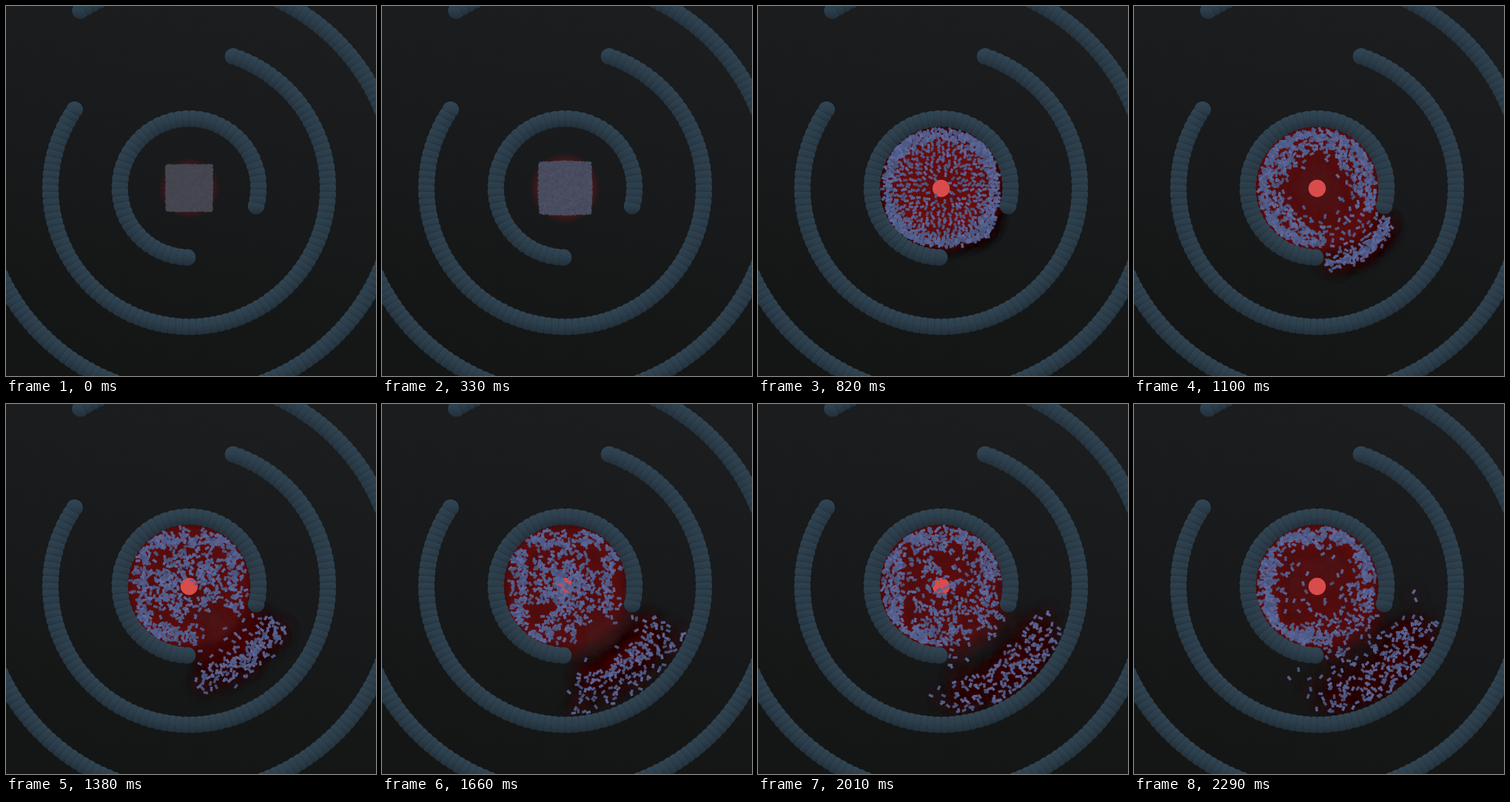
Recreate the animation shown at these times as an HTML page with a canvas. Size 500 by 500 pixels, loop 2360 ms.

```html
<!DOCTYPE html>
<html lang="en">
<head>
<meta charset="utf-8">
<title>Particle burst</title>
<style>
  html, body { margin: 0; width: 100%; height: 100%; overflow: hidden; background: #17191a; }
  canvas { display: block; width: 500px; height: 500px; }
</style>
</head>
<body>
<canvas id="stage" width="500" height="500"></canvas>
<script>
const SIZE = 500, CX = 247.5, CY = 246;
const LOOP = 2360, HOLD = 330, STEP = 70, LAST = 29;
const BEAD = 11.3, SPACING = 93.75;
const INNER_WALL = 80, INNER_BACK = 106, OUTER_WALL = 174;
const GRID = 32, PITCH = 1.87;
const rad = deg => deg * Math.PI / 180;
const GAP_FROM = rad(23), GAP_TO = rad(83), GAP_MID = rad(53);
const ctx = document.getElementById('stage').getContext('2d');

let seed = 20417;
function rnd() {
  seed = (seed + 0x6D2B79F5) | 0;
  let t = Math.imul(seed ^ (seed >>> 15), 1 | seed);
  t = (t + Math.imul(t ^ (t >>> 7), 61 | t)) ^ t;
  return ((t ^ (t >>> 14)) >>> 0) / 4294967296;
}
const spread = w => (rnd() * 2 - 1) * w;
const mix = (a, b, k) => a + (b - a) * k;

function makeLayer(w, paint) {
  const layer = document.createElement('canvas');
  layer.width = layer.height = w;
  paint(layer.getContext('2d'));
  return layer;
}

// ---- Static scenery ----

const backdrop = makeLayer(SIZE, g => {
  const fill = g.createLinearGradient(300, 0, 200, SIZE);
  fill.addColorStop(0, 'rgb(27,29,31)');
  fill.addColorStop(0.55, 'rgb(23,25,26)');
  fill.addColorStop(1, 'rgb(20,22,21)');
  g.fillStyle = fill;
  g.fillRect(0, 0, SIZE, SIZE);
});

// Spheres that cut into each other: each is clipped to its own wedge.
function drawRing(g, radius, from, to, count) {
  const gap = (to - from) / count;
  for (let i = 0; i <= count; i++) {
    const a = rad(from + gap * i), half = rad(gap / 2);
    const x = CX + radius * Math.cos(a), y = CY + radius * Math.sin(a);
    const lo = a - (i === 0 ? 0.3 : half), hi = a + (i === count ? 0.3 : half);
    g.save();
    g.beginPath();
    g.moveTo(CX, CY);
    g.lineTo(CX + 400 * Math.cos(lo), CY + 400 * Math.sin(lo));
    g.lineTo(CX + 400 * Math.cos(hi), CY + 400 * Math.sin(hi));
    g.clip();
    const shade = g.createLinearGradient(x, y - BEAD, x, y + BEAD);
    shade.addColorStop(0, 'rgb(50,70,84)');
    shade.addColorStop(0.5, 'rgb(44,62,75)');
    shade.addColorStop(1, 'rgb(33,47,57)');
    g.fillStyle = shade;
    g.beginPath();
    g.arc(x, y, BEAD, 0, 7);
    g.fill();
    g.restore();
  }
}

const rings = makeLayer(SIZE, g => {
  drawRing(g, SPACING, 91.5, 375, 50);
  drawRing(g, SPACING * 2, -71.5, 214.3, 100);
  drawRing(g, SPACING * 3, 238.5, 524.5, 150);
});

// ---- Particle motion, one entry per step ----

function makeParticles() {
  const list = [];
  for (let i = 0; i < GRID * GRID; i++) {
    const x = (i % GRID - (GRID - 1) / 2) * PITCH + spread(0.5);
    const y = (Math.floor(i / GRID) - (GRID - 1) / 2) * PITCH + spread(0.5);
    const r = Math.hypot(x, y), speed = (5.3 - rnd()) * Math.min(1, r / 18);
    const slow = rnd() < 0.58;
    list.push({
      x, y, vx: x / r * speed, vy: y / r * speed,
      slow, held: false, out: false, hits: 0,
      bounce: slow ? mix(0.05, 0.5, rnd()) : mix(0.75, 1.25, rnd()),
      drag: mix(0.86, 1, rnd()),
      rest: rnd() < 0.5 ? 64 + spread(1.5) : mix(56, 78, rnd()),
      angle: Math.atan2(y, x) + spread(0.35),
      spin: spread(0.35),
      tone: rnd(),
      path: [[x, y]]
    });
  }
  return list;
}

const inGap = a => a > GAP_FROM && a < GAP_TO;

function setPolar(p, r, a, vr, vt) {
  const c = Math.cos(a), s = Math.sin(a);
  p.x = r * c; p.y = r * s;
  p.vx = vr * c - vt * s;
  p.vy = vr * s + vt * c;
}

// Settle on a rounded square and drift along it towards the opening.
function hold(p, r) {
  const pull = m => (p.rest - Math.abs(m)) * 0.06 * Math.sign(m);
  if (Math.abs(p.x) > Math.abs(p.y)) p.vx += pull(p.x);
  else p.vy += pull(p.y);
  const turn = Math.atan2(p.y, p.x) - GAP_MID;
  const away = Math.atan2(Math.sin(turn), Math.cos(turn));
  const flow = 0.35 * Math.sign(away) * Math.exp(-((away / rad(60)) ** 2));
  p.vx = (p.vx + p.y / r * flow) * 0.87 + spread(0.6);
  p.vy = (p.vy - p.x / r * flow) * 0.87 + spread(0.6);
}

function push(p, n, r) {
  const outward = p.x * p.vx + p.y * p.vy >= 0;
  if (p.held && inGap(Math.atan2(p.y, p.x))) p.held = false;
  if (p.held) {
    hold(p, r);
  } else if (r < INNER_WALL || (p.hits && r < INNER_BACK)) {
    const a = p.hits ? 0.25 : 0.08 * Math.min(n, 8);
    if (outward || r > 55) {
      p.vx += p.x / r * a;
      p.vy += p.y / r * a;
    }
  } else {
    p.vx *= p.drag;
    p.vy *= p.drag;
  }
}

function move(p, n) {
  const before = Math.hypot(p.x, p.y) + 0.01;
  push(p, n, before);
  p.x += p.vx;
  p.y += p.vy;
  const r = Math.hypot(p.x, p.y), a = Math.atan2(p.y, p.x);
  const c = Math.cos(a), s = Math.sin(a);
  const vr = p.vx * c + p.vy * s, vt = p.vy * c - p.vx * s;
  const side = (a - GAP_MID) / rad(30);

  if (before <= INNER_WALL + 0.02 && r > INNER_WALL && !inGap(a)) {
    const e = p.hits++ ? 0.35 : p.bounce;
    setPolar(p, INNER_WALL - rnd() * 3, a, -e * Math.abs(vr), vt + spread(p.slow ? 1.5 : 4.5));
    p.held = p.slow || p.hits > 1;
  } else if (r > OUTER_WALL) {
    setPolar(p, OUTER_WALL - rnd() * 4, a, -Math.abs(vr) * mix(0.4, 0.95, rnd()),
      vt * 0.6 + side * 2.4 + spread(2.5));
  } else if (before >= INNER_BACK && r < INNER_BACK && !inGap(a)) {
    setPolar(p, INNER_BACK + 1, a, Math.abs(vr) * 0.4, vt);
  } else if (r > INNER_WALL && r < INNER_BACK && !inGap(a)) {
    setPolar(p, r, Math.min(GAP_TO, Math.max(GAP_FROM, a)), vr, -vt * 0.3);
  } else if (r > INNER_BACK && !p.out) {
    p.out = true;
    setPolar(p, r, a, vr, vt + side * 3 * rnd() + spread(0.7));
  }
  p.path.push([p.x, p.y]);
}

const particles = makeParticles();
for (let n = 1; n <= LAST; n++) particles.forEach(p => move(p, n));

// ---- Drawing ----

const HALO = 24;
const halo = makeLayer(HALO * 2, g => {
  const glow = g.createRadialGradient(HALO, HALO, 0, HALO, HALO, HALO);
  glow.addColorStop(0, 'rgba(125,20,22,0.045)');
  glow.addColorStop(0.5, 'rgba(125,20,22,0.024)');
  glow.addColorStop(1, 'rgba(125,20,22,0)');
  g.fillStyle = glow;
  g.fillRect(0, 0, HALO * 2, HALO * 2);
});

// Light stays inside the inner ring and the sector behind its opening.
function clipLight() {
  ctx.beginPath();
  ctx.arc(CX, CY, SPACING, 0, 7);
  ctx.moveTo(CX + SPACING * 2 * Math.cos(rad(-25)), CY + SPACING * 2 * Math.sin(rad(-25)));
  ctx.arc(CX, CY, SPACING * 2, rad(-25), rad(135));
  ctx.arc(CX, CY, SPACING, rad(135), rad(-25), true);
  ctx.clip();
}

function drawLight(n) {
  ctx.save();
  clipLight();
  const delayed = Math.max(0, n - 4);
  ctx.globalAlpha = Math.min(1, n / 10);
  particles.forEach((p, i) => {
    const [x, y] = p.path[i % 2 ? n : delayed];
    ctx.drawImage(halo, CX + x - HALO, CY + y - HALO);
  });
  ctx.globalAlpha = mix(0.25, 0.6, Math.min(1, n / 4));
  const reach = Math.min(INNER_BACK, 42 + n * 6);
  const red = Math.round(mix(185, 108, Math.min(1, Math.max(0, n - 5) / 6)));
  const base = ctx.createRadialGradient(CX, CY, 0, CX, CY, reach);
  base.addColorStop(0, `rgba(${red},20,22,1)`);
  base.addColorStop(0.72, `rgba(${red},20,22,1)`);
  base.addColorStop(1, `rgba(${red},20,22,0)`);
  ctx.fillStyle = base;
  ctx.beginPath();
  ctx.arc(CX, CY, reach, 0, 7);
  ctx.fill();
  ctx.restore();
}

function drawParticles(n) {
  const warm = Math.min(1, n / 4);
  const turn = Math.max(0, n - 6);
  const w = 6.2, h = mix(4, 3.5, warm);
  for (const p of particles) {
    const [x, y] = p.path[n], k = p.tone;
    const r = mix(68 + k * 6, 70 + k * 28, warm);
    const g = mix(68 + k * 6, 84 + k * 24, warm);
    const b = mix(78 + k * 8, 124 + k * 36, warm);
    const a = p.angle + p.spin * turn, c = Math.cos(a), s = Math.sin(a);
    ctx.setTransform(c, s, -s, c, CX + x, CY + y);
    ctx.fillStyle = `rgba(${r | 0},${g | 0},${b | 0},0.93)`;
    ctx.fillRect(-w / 2, -h / 2, w, h);
  }
  ctx.setTransform(1, 0, 0, 1, 0, 0);
}

function draw(n) {
  ctx.drawImage(backdrop, 0, 0);
  drawLight(n);
  ctx.drawImage(rings, 0, 0);
  ctx.fillStyle = 'rgb(216,76,76)';
  ctx.beginPath();
  ctx.arc(CX, CY + 0.5, 11.7, 0, 7);
  ctx.fill();
  drawParticles(n);
}

let shown = -1;
function tick() {
  const t = performance.now() % LOOP;
  const n = t < HOLD ? 0 : Math.min(LAST, 1 + Math.floor((t - HOLD) / STEP));
  if (n !== shown) draw(shown = n);
  requestAnimationFrame(tick);
}
tick();
</script>
</body>
</html>
```
